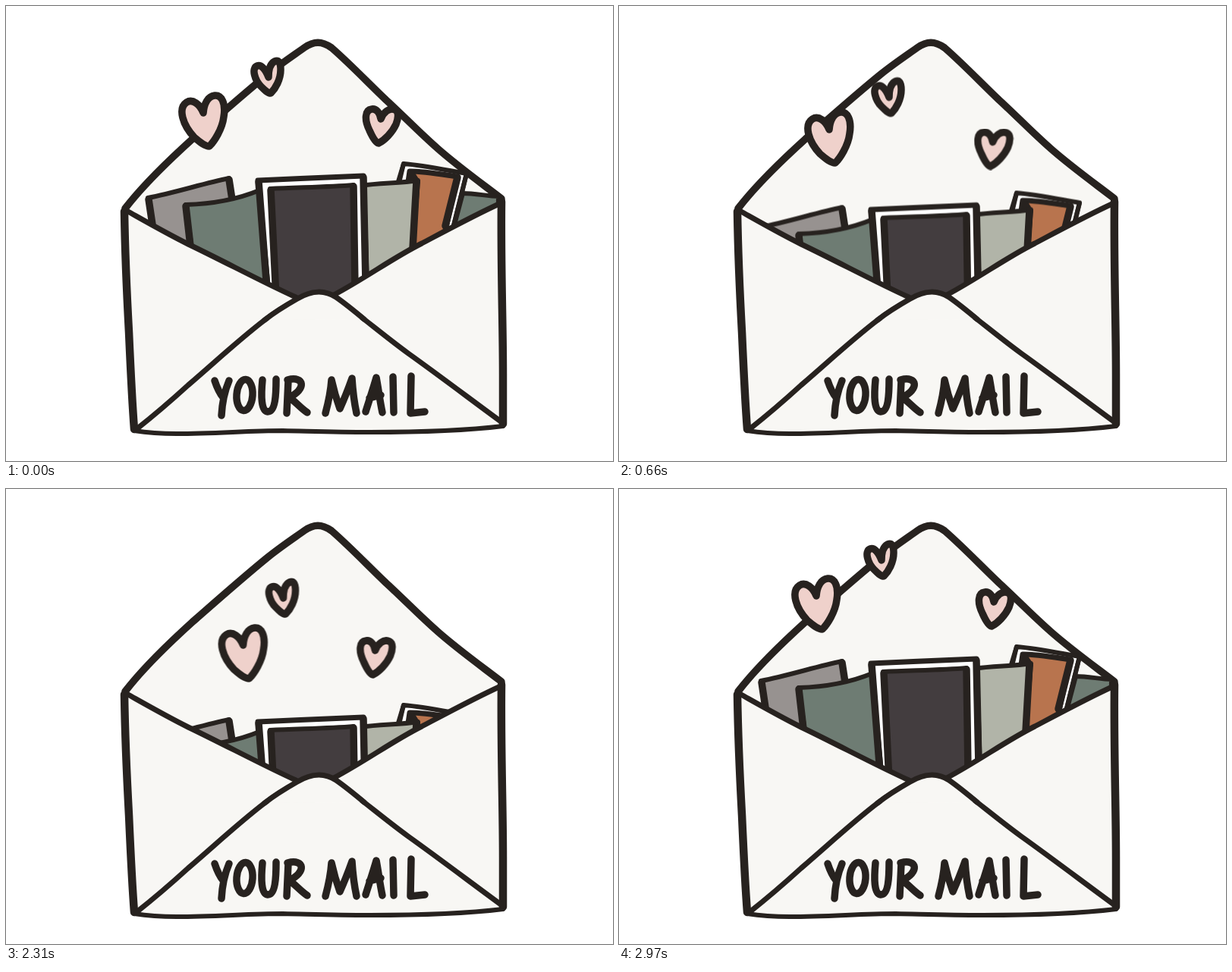
Animation of 800x600 px, one loop 3.3 s. Source, as an HTML page:

```html
<!DOCTYPE html>
<html lang="en">
<head>
<meta charset="utf-8">
<title>Check your mail</title>
<style>
  html, body { margin: 0; width: 100%; height: 100%; overflow: hidden; background: #fff; }
  svg { display: block; width: 100vw; height: 100vh; }
  .ink { fill: none; stroke: #27221f; stroke-linecap: round; stroke-linejoin: round; }
  .paper { fill: #f8f7f4; }
  .white { fill: #fff; }
  .pink { fill: #efd1cb; stroke-width: 9.5; }
  .gray { fill: #979290; }
  .green { fill: #6e7c73; }
  .sage { fill: #b1b4a8; }
  .plum { fill: #433d3f; }
  .rust { fill: #b8744e; }
  .thin { stroke-width: 6; }
  .fold { stroke-width: 7; }
  .mid { stroke-width: 7; }
  .bold { stroke-width: 9.5; }
  .letters { stroke-width: 9.5; }

  .open, .closed, .move { animation: 3300ms step-end infinite; }
  .open { animation-name: open; }
  .closed { animation-name: closed; }
  .move { animation-name: move; }
  .prints { --half: 0, 38.5px; --full: 0, 77px; }
  .big { --half: 17px, 22px; --full: 52.5px, 65px; }
  .small { --half: 10px, 26.5px; --full: 19.5px, 50px; }
  .right { --half: -1.5px, 30.5px; --full: -7.5px, 64px; }

  @keyframes open { 0%, 70% { visibility: visible; } 40% { visibility: hidden; } }
  @keyframes closed { 0%, 70% { visibility: hidden; } 40% { visibility: visible; } }
  @keyframes move {
    0%, 90% { transform: translate(0, 0); }
    20%, 80% { transform: translate(var(--half)); }
    30%, 70% { transform: translate(var(--full)); }
  }
</style>
</head>
<body>
<svg viewBox="0 0 800 600" role="img" aria-label="Check your mail">
  <g class="open">
    <path class="ink paper bold" d="M157 267C180 237 213 205 245 176C278 147 313 116 345 90C361 77 379 65 393 55C406 46 416 46 429 55C451 74 476 100 501 124C524 145 545 167 569 188C595 211 627 234 653 254L640 450H170Z"/>

    <g class="move prints">
      <path class="ink green thin" d="M602 247C619 247 635 251 649 251L648 330H580Z"/>

      <path class="ink white thin" d="M524 208C550 210 583 217 607 221L576 345L495 330Z"/>
      <path class="ink thin" d="M524 208L515 238M607 221L590 290"/>
      <path class="ink rust mid" d="M532 218C552 218 574 222 595 225L567 350L515 335Z"/>
      <path class="ink bold" d="M595 226L579 290M534 221L541 232"/>

      <path class="ink gray thin" d="M187 253C220 247 260 234 294 227L308 340L205 380Z"/>
      <path class="ink bold" d="M188 255L194 295M294 229L298 255"/>

      <path class="ink green thin" d="M237 262C273 261 305 255 334 243L350 410L256 400Z"/>
      <path class="ink bold" d="M237 264L244 325"/>

      <path class="ink sage thin" d="M468 237C492 233 519 234 543 230L531 380L468 400Z"/>
      <path class="ink bold" d="M541 231L536 320"/>

      <path class="ink white mid" d="M332 230C378 228 426 226 471 224L477 420H350Z"/>
      <path class="ink bold" d="M333 232L344 375M471 226L474 365"/>
      <path class="ink plum thin" d="M348 241C385 239 424 239 458 236L462 420H359Z"/>
      <path class="ink bold" d="M349 243L356 385M458 238L460 372"/>
    </g>
  </g>

  <path class="paper" d="M157 269C184 284 210 299 240 314C288 337 338 364 382 384L432 381C475 358 510 332 548 313C582 295 619 275 653 259C652 380 655 490 655 552C515 565 440 560 365 560Q245 566 169 560C162 450 160 350 157 269Z"/>
  <g class="closed">
    <path class="paper" d="M157 269L400 268L653 260L432 381Q404 400 382 384Z"/>
  </g>

  <g class="ink">
    <path class="fold" d="M159 270C184 284 210 299 240 314C288 337 338 364 382 384M652 260C619 275 582 295 548 313C510 332 475 358 432 381"/>
    <path class="thin" d="M169 560C188 563 207 564 225 564C275 564 320 560 365 560C410 561 435 562 480 562C540 562 605 560 655 554"/>
    <path stroke-width="10.5" d="M156 271C157 335 159 375 162 430C164 475 166 520 169 558M653 258C652 340 655 420 655 485V551"/>
    <path class="fold" d="M172 558C196 539 217 521 240 500C275 470 307 440 341 414C355 403 370 394 385 386M432 383C466 407 497 434 530 458C572 488 614 520 655 550"/>
  </g>

  <g class="open">
    <path class="ink paper fold" d="M341 414C355 403 370 394 384 386C402 375 420 374 435 384C448 393 460 403 472 413"/>
  </g>

  <g class="closed">
    <g class="ink">
      <path stroke-width="4.5" d="M154 270C230 269 320 270 400 269C475 266 510 268 565 266C598 265 630 262 655 260"/>
      <path class="thin" d="M382 384C398 392 410 393 432 381"/>
    </g>
    <g class="ink letters">
      <path d="M346 297C332 289 325 306 326 322C327 343 337 346 348 334"/>
      <path d="M361 294L364 336M380 293L381 336M364 317L380 313"/>
      <path d="M416 291L398 294L402 338L416 333M400 315L413 312"/>
      <path d="M446 294C435 288 428 300 428 312C429 329 437 333 448 325"/>
      <path d="M460 291L463 330M481 291C476 299 470 306 464 311C470 317 476 321 482 326"/>
    </g>
  </g>

  <g class="ink letters">
    <path d="M275 494C278 503 281 510 286 516M294 494C288 508 285 521 284 540"/>
    <ellipse cx="314.5" cy="513" rx="10.5" ry="20.5" transform="rotate(4 314.5 513)"/>
    <path d="M338 493C336 514 336 534 345 535C355 535 356 512 356 492"/>
    <path d="M372 494L370 537M371 493C394 487 396 506 373 516C382 522 388 530 397 536"/>
    <path d="M421 537C425 522 428 508 429 493C432 507 436 520 440 531C446 518 451 505 456 491C457 507 459 523 462 537"/>
    <path d="M474 535C479 519 484 504 488 490C491 506 493 522 496 536M479 517L494 513"/>
    <path d="M510 489L511 536"/>
    <path d="M534 488L533 537L552 535"/>
  </g>

  <g class="open">
    <path class="ink pink move big" d="M260 141C256 130 246 122 238 127C226 135 233 157 248 173C256 180 262 185 268 185C274 179 285 163 287 146C290 128 284 117 275 118C266 119 261 129 260 141Z"/>
    <path class="ink pink move small" d="M346 94C342 83 336 77 331 79C323 82 328 98 336 106C341 111 345 115 349 115C355 109 362 97 362 84C362 74 359 71 354 73C348 76 346 84 346 94Z"/>
    <path class="ink pink move right" d="M494 149C493 141 488 135 482 136C473 137 472 150 479 164C483 173 487 180 491 181C499 177 509 167 514 156C518 146 517 139 513 137C505 133 497 141 494 149Z"/>
  </g>
</svg>
</body>
</html>
```
